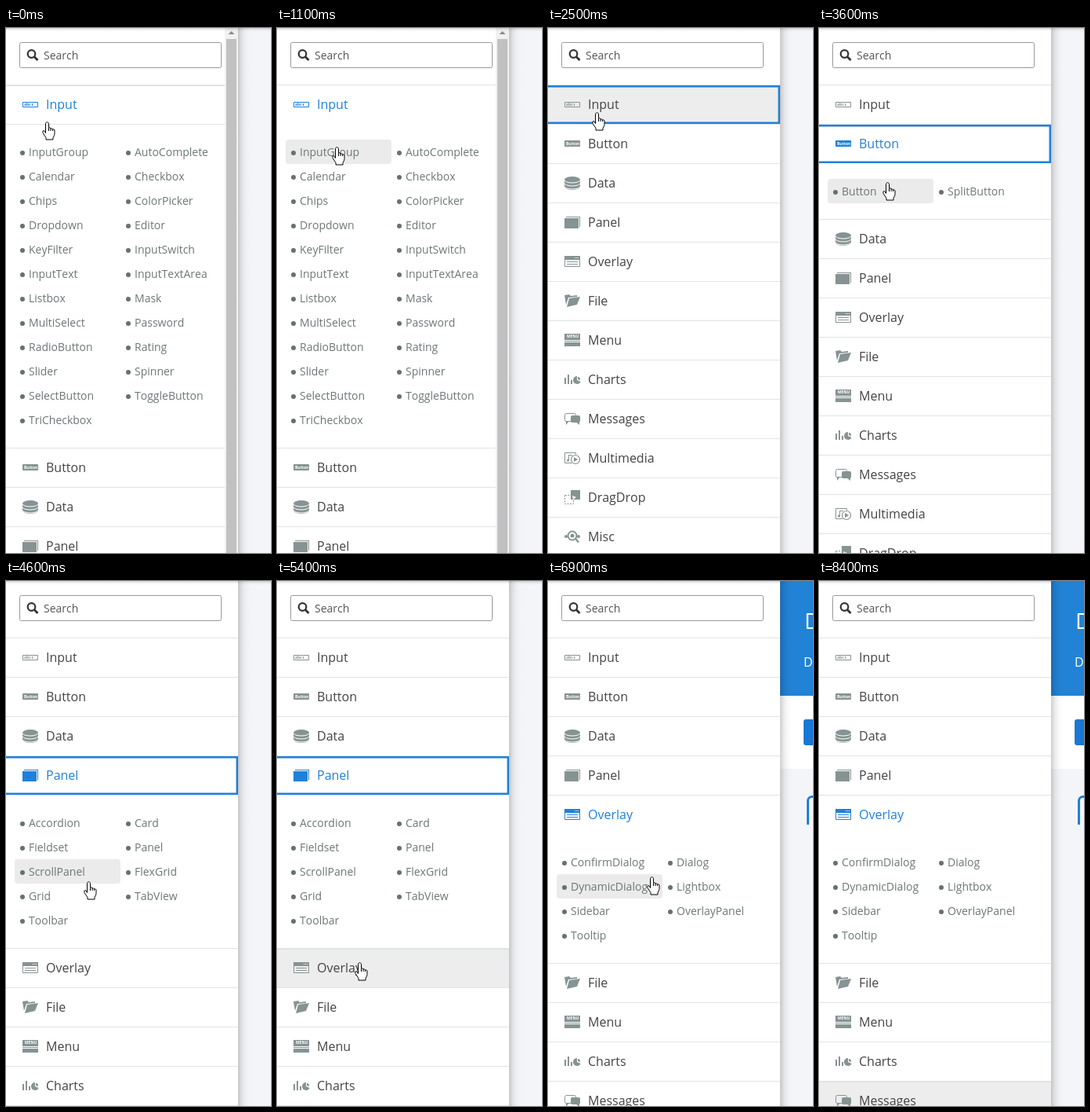
Recreate the animation shown at these times as an HTML page with a canvas. Size 338 by 668 pixels, loop 8500 ms.

```html
<!DOCTYPE html>
<html lang="en">
<head>
<meta charset="utf-8">
<title>Component sidebar</title>
<style>
html, body { margin: 0; width: 100%; height: 100%; overflow: hidden; background: #f4f5f8; }
canvas { display: block; }
</style>
</head>
<body>
<canvas id="stage" width="338" height="668"></canvas>
<script>
const ctx = document.getElementById('stage').getContext('2d');
const LOOP = 8500, W = 338, H = 668, SIDE = 296;
const ROW = 50, ITEM = 31, CELL = 135;
const BLUE = '#2080d8', GREY = '#879393', LINE = '#dfe4e6';
const FONT = '"Open Sans", "Noto Sans", sans-serif';

const sections = [
  ['Input', 'InputGroup AutoComplete Calendar Checkbox Chips ColorPicker Dropdown Editor KeyFilter InputSwitch InputText InputTextArea Listbox Mask MultiSelect Password RadioButton Rating Slider Spinner SelectButton ToggleButton TriCheckbox'],
  ['Button', 'Button SplitButton'],
  ['Data'],
  ['Panel', 'Accordion Card Fieldset Panel ScrollPanel FlexGrid Grid TabView Toolbar'],
  ['Overlay', 'ConfirmDialog Dialog DynamicDialog Lightbox Sidebar OverlayPanel Tooltip'],
  ['File'], ['Menu'], ['Charts'], ['Messages'], ['Multimedia'], ['DragDrop'], ['Misc']
].map(([name, list]) => ({ name, items: list ? list.split(' ') : [] }));

// Each click closes the open section; Input is open at the start.
const clicks = [
  { at: 2110, on: 'Input' }, { at: 3150, on: 'Button' },
  { at: 4180, on: 'Panel' }, { at: 5440, on: 'Overlay' }
];
const PAGE_AT = 6500, STALL = [7100, 8350];

// Fingertip stops: time, x, y
const stops = [[0, 53, 119], [600, 80, 161], [1500, 74, 143], [2100, 64, 94], [2500, 63, 107],
  [3000, 74, 146], [3600, 88, 196], [4000, 98, 314], [4600, 106, 382], [5000, 104, 482],
  [5500, 106, 486], [5800, 109, 421], [6400, 133, 376], [7100, 133, 376], [8000, 20, 669]];

const clamp = v => Math.min(1, Math.max(0, v));

function pointer(t) {
  const n = stops.findIndex(s => s[0] > t);
  if (n < 0) return stops.at(-1).slice(1);
  const [t0, x0, y0] = stops[n - 1], [t1, x1, y1] = stops[n];
  const k = (t - t0) / (t1 - t0);
  return [Math.round(x0 + (x1 - x0) * k), Math.round(y0 + (y1 - y0) * k)];
}

// cubic-bezier(.86, 0, .07, 1) over 400 ms
function slide(ms) {
  const x = clamp(ms / 400);
  let lo = 0, hi = 1;
  for (let i = 0; i < 24; i++) {
    const s = (lo + hi) / 2, r = 1 - s;
    if (3 * r * r * s * .86 + 3 * r * s * s * .07 + s * s * s < x) lo = s; else hi = s;
  }
  return lo * lo * (3 - 2 * lo);
}

function layout(t) {
  let y = 72;
  return sections.map(({ name, items }, i) => {
    const n = clicks.findIndex(c => c.on === name);
    const from = i === 0 ? -LOOP : n < 0 ? Infinity : clicks[n].at;
    const to = i === 0 ? clicks[0].at : clicks[n + 1]?.at ?? Infinity;
    const focusEnd = clicks[n + 1]?.at ?? PAGE_AT;
    const full = 40 + ITEM * Math.ceil(items.length / 2);
    const h = items.length ? full * (slide(t - from) - slide(t - to)) : 0;
    const row = {
      name, items, y, h, top: Math.round(y), open: t >= from && t < to,
      focus: n >= 0 && t >= clicks[n].at && t < focusEnd
    };
    y += ROW + h;
    return row;
  });
}

function rect(x, y, w, h, color) {
  ctx.fillStyle = color;
  ctx.fillRect(x, y, w, h);
}
function box(x, y, w, h, r, color) {
  ctx.fillStyle = color;
  ctx.beginPath();
  ctx.roundRect(x, y, w, h, r);
  ctx.fill();
}
function frame(x, y, w, h, color, lw = 1, r = 0) {
  ctx.strokeStyle = color;
  ctx.lineWidth = lw;
  ctx.beginPath();
  ctx.roundRect(x + lw / 2, y + lw / 2, w - lw, h - lw, r);
  ctx.stroke();
}
function arc(x, y, r, color, lw = 0, a = 0, b = 7) {
  ctx.fillStyle = ctx.strokeStyle = color;
  ctx.lineWidth = lw;
  ctx.beginPath();
  if (b < 6) ctx.moveTo(x, y);
  ctx.arc(x, y, r, a, b);
  if (lw) ctx.stroke(); else ctx.fill();
}
function shape(points, color) {
  ctx.fillStyle = color;
  ctx.beginPath();
  for (let i = 0; i < points.length; i += 2) ctx.lineTo(points[i], points[i + 1]);
  ctx.fill();
}
function text(s, x, y, size, color, style = '') {
  ctx.font = `${style} ${size}px ${FONT}`;
  ctx.fontKerning = 'none';
  ctx.fillStyle = color;
  ctx.fillText(s, x, y);
}
function shadow(x, y, w, h, dx, dy) {
  const g = ctx.createLinearGradient(x, y, x + dx, y + dy);
  for (let k = 0; k <= 1; k += .125) g.addColorStop(k, `rgba(0,0,0,${.2 * (1 - k) ** 4})`);
  rect(x, y, w, h, g);
}

// Icons sit in a 20 px wide cell, with y = 0 at the row's middle.
const icons = {
  Input(c) {
    frame(0, -3, 20, 7, c);
    text('abc', 2, 2, 5, c, 'bold');
    rect(12, -1, 1, 3, c);
  },
  Button(c) {
    box(0, -4, 20, 8, 1, c);
    text('Button', 2, 2, 5, '#fff', 'bold');
  },
  Data(c) {
    ctx.fillStyle = c;
    ctx.beginPath();
    ctx.ellipse(10, -4, 10, 4, 0, Math.PI, 0);
    ctx.ellipse(10, 5, 10, 4, 0, 0, Math.PI);
    ctx.fill();
    ctx.strokeStyle = '#fff';
    ctx.lineWidth = 1;
    for (let y = -4; y < 5; y += 4) {
      ctx.beginPath();
      ctx.ellipse(10, y, 10.5, 4, 0, 0, Math.PI);
      ctx.stroke();
    }
  },
  Panel(c) {
    rect(2, -7, 18, 13, c);
    rect(0, -6, 19, 13, '#fff');
    rect(0, -5, 18, 13, c);
  },
  Overlay(c) {
    frame(0, -7, 20, 14, c);
    rect(0, -7, 20, 5, c);
    for (let x = 13; x < 18; x += 2) rect(x, -5, 1, 1, '#fff');
    rect(3, 0, 14, 1, c);
    rect(3, 3, 14, 1, c);
  },
  File(c) {
    shape([0, -7, 6, -8, 8, -6, 16, -7, 16, -5, 5, -4, 2, 5], c);
    shape([6, -3, 20, -5, 16, 5, 3, 8], c);
  },
  Menu(c) {
    rect(0, -8, 20, 8, c);
    text('MENU', 3, -3, 5, '#fff', 'bold');
    rect(0, 1, 20, 1, c);
    rect(0, 3, 20, 5, c);
  },
  Charts(c) {
    [8, 12, 5].forEach((h, i) => rect(i * 4, 6 - h, 2, h, c));
    arc(16, 1, 5, c, 0, .4, Math.PI * 1.5);
    arc(17, 0, 3, c, 0, -Math.PI / 2, .3);
  },
  Messages(c) {
    frame(0, -7, 15, 11, c, 1, 2);
    shape([2, 3, 6, 3, 2, 8], c);
    box(8, -4, 12, 9, 2, c);
    shape([14, 4, 19, 4, 19, 8], c);
  },
  Multimedia(c) {
    frame(0, -7, 15, 14, c);
    rect(5, -4, 1, 7, c);
    rect(5, -4, 5, 1, c);
    arc(4.5, 3, 1.5, c);
    arc(14, 2, 6.5, '#fff');
    arc(14, 2, 5.5, c, 1.2);
    shape([12, -1, 17, 2, 12, 5], c);
  },
  DragDrop(c) {
    rect(8, -9, 12, 12, c);
    ctx.setLineDash([2, 1.5]);
    frame(0, -3, 12, 12, c);
    ctx.setLineDash([]);
    shape([10, -2, 15, 0, 11, 3], '#fff');
  },
  Misc(c) {
    arc(2, 0, 2, c);
    arc(18, 0, 2, c);
    arc(10, -1, 5.5, c, 2);
    arc(10, -1, 2.5, c);
    shape([13, 3, 15, 2, 19, 7, 17, 8], c);
  }
};

function drawPage(t) {
  rect(SIDE, 0, W - SIDE, H, '#f4f5f8');
  if (t >= PAGE_AT) {
    rect(SIDE, 0, W - SIDE, 146, '#2282d6');
    rect(SIDE, 146, W - SIDE, 93, '#fff');
    text('DynamicDialog', 327, 61, 28, '#fff');
    text('Dialogs', 326, 109, 16, '#fff');
    box(326, 176, 60, 33, 3, '#1878d4');
    ctx.save();
    ctx.beginPath();
    ctx.rect(SIDE, 270, W, 40);
    ctx.clip();
    frame(330, 273, 80, 80, BLUE, 3, 5);
    ctx.restore();
  }
  shadow(SIDE, 0, 24, H, 24, 0);
}

function drawSearch() {
  frame(17, 18, 258, 33, '#999', 1, 2);
  arc(32.5, 33, 4.8, '#333', 2.2);
  ctx.beginPath();
  ctx.moveTo(36, 36.5);
  ctx.lineTo(40.5, 41);
  ctx.lineWidth = 2.8;
  ctx.stroke();
  text('Search', 48, 40, 14, '#555');
}

function drawItems({ items, y, h }, [px, py]) {
  const top = Math.floor(y) + ROW;
  ctx.save();
  ctx.beginPath();
  ctx.rect(0, top, SIDE, h);
  ctx.clip();
  items.forEach((name, k) => {
    const x = 11 + k % 2 * CELL, cy = top + 36 + ITEM * (k >> 1);
    const over = px >= x && px < x + CELL && py >= cy - 16 && py < cy + 15 && py < top + h;
    if (over) box(x, cy - 16, CELL, ITEM, 4, '#ebebeb');
    arc(x + 10, cy + 1, 3, '#667171');
    text(name, x + 18, cy + 5, 14, '#6c7777');
  });
  ctx.restore();
}

function drawRow(row, width, tip) {
  const { name, top, h, open, focus } = row;
  const over = tip[0] < width && tip[1] > top && tip[1] <= top + ROW;
  const color = open ? BLUE : '#444';
  if (over && !open) rect(0, top + 1, width, ROW - 1, '#ededed');
  rect(0, top, width, over ? 2 : 1, LINE);
  if (h > .3) drawItems(row, tip);
  if (over || !open) rect(0, top + ROW, width, 1, LINE);
  ctx.save();
  ctx.translate(21, top + 25);
  icons[name](open ? BLUE : GREY);
  ctx.restore();
  text(name, 51, top + 31, 16, color);
  if (focus) frame(-3, top + 1, width + 3, ROW - 1, BLUE, 2.5);
}

function drawMenu(t) {
  const rows = layout(t);
  const bar = rows.at(-1).y > 850;
  const width = bar ? 279 : SIDE;
  const stalled = t > STALL[0] && t < STALL[1];
  const tip = pointer(stalled ? STALL[0] : t);
  for (const row of rows) drawRow(row, width, tip);
  if (bar) {
    rect(279, 0, 17, H, '#f1f1f1');
    rect(281, 14, 13, H, '#c1c1c1');
    shape([283.5, 8, 287.5, 4, 291.5, 8], '#8a8a8a');
  }
}

function drawHand(t) {
  const [x, y] = pointer(t);
  ctx.save();
  ctx.translate(x - .5, y + .5);
  ctx.beginPath();
  ctx.moveTo(-2, 2);
  ctx.quadraticCurveTo(0, -2, 2, 2);
  ctx.lineTo(2, 7);
  for (let k = 1; k <= 3; k++) ctx.quadraticCurveTo(2.5 * k + 1, 5.5 + k, 2 + 2.5 * k, 7.5 + k);
  ctx.lineTo(9.5, 15);
  ctx.quadraticCurveTo(9.5, 17, 7.5, 20);
  ctx.lineTo(7.5, 22.5);
  ctx.lineTo(-1.5, 22.5);
  ctx.lineTo(-1.5, 20);
  ctx.lineTo(-5.5, 14);
  ctx.quadraticCurveTo(-6.5, 11, -4, 11);
  ctx.lineTo(-2, 14);
  ctx.closePath();
  ctx.fillStyle = '#fff';
  ctx.fill();
  for (let k = 0; k < 3; k++) {
    ctx.moveTo(2 + 2.5 * k, 7.5 + k);
    ctx.lineTo(2 + 2.5 * k, 11.5);
  }
  ctx.strokeStyle = '#000';
  ctx.lineWidth = 1;
  ctx.stroke();
  ctx.restore();
}

function draw(t) {
  drawPage(t);
  rect(0, 0, SIDE, H, '#fff');
  drawSearch();
  drawMenu(t);
  shadow(0, 0, t >= PAGE_AT ? SIDE : W, 8, 0, 8);
  drawHand(t);
}

const start = performance.now();
function tick() {
  draw((performance.now() - start) % LOOP);
  requestAnimationFrame(tick);
}
tick();
</script>
</body>
</html>
```
